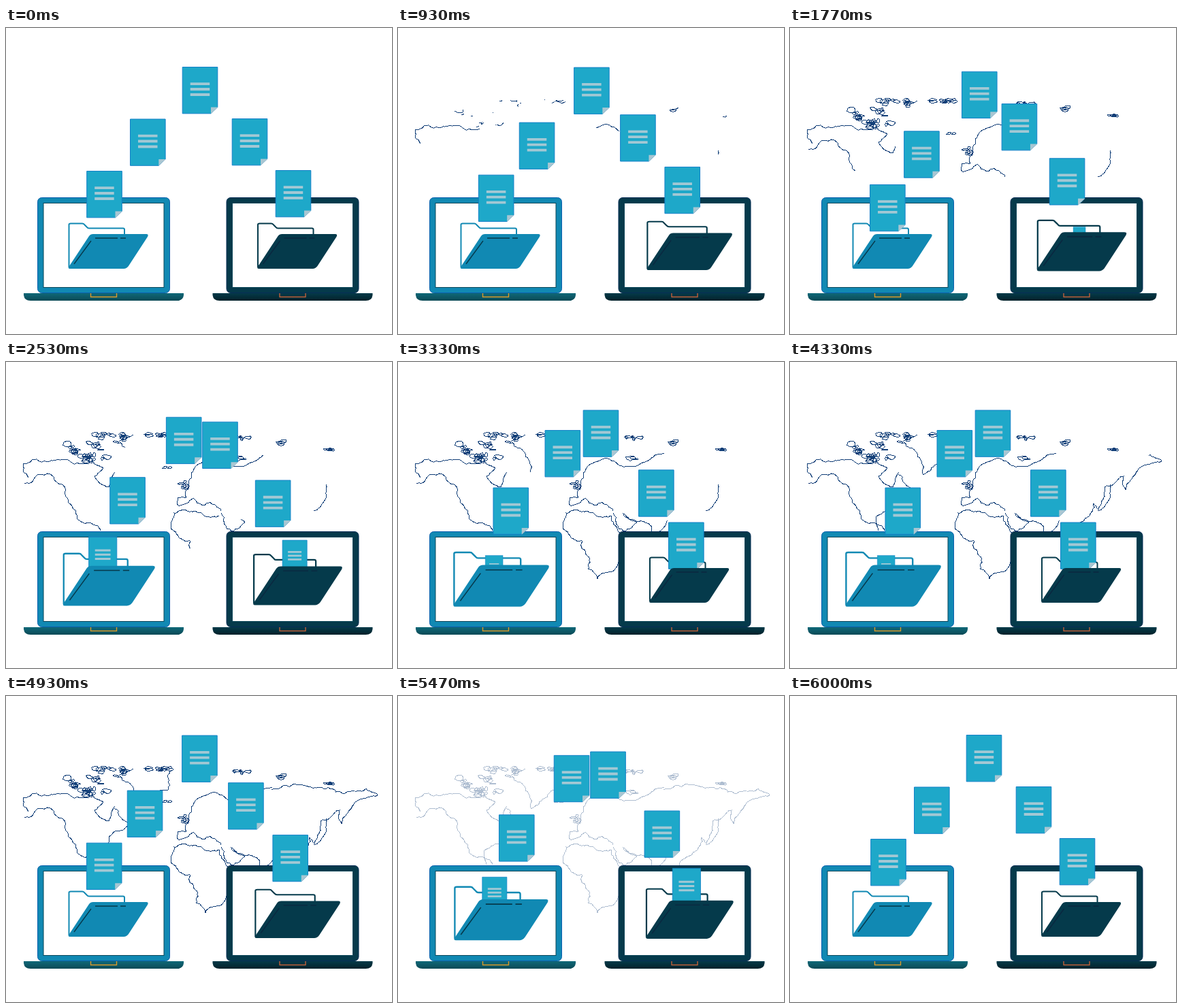
These frames come from a looping animation (567x450 px, 6030 ms). An HTML page:

```html
<!DOCTYPE html>
<html lang="en">
<head>
<meta charset="utf-8">
<title>File transfer</title>
<style>
  html, body { margin: 0; width: 100%; height: 100%; overflow: hidden; background: #fff; }
  svg { display: block; width: 567px; height: 450px; }
  #map path { fill: none; stroke: #123f78; stroke-width: 1; shape-rendering: crispEdges; }
  .left { --main: #1189b3; --edge: #0b5fae; --detail: #06384a; --notch: #d99a2b; }
  .right { --main: #053a4b; --edge: #062c55; --detail: #0b2740; --notch: #c0603a; }
  .lid { fill: var(--main); stroke: var(--edge); }
  .screen { fill: #fff; stroke: #0b4658; }
  .notch { fill: none; stroke: var(--notch); stroke-width: 1.4; }
  .back { fill: none; stroke: var(--main); stroke-width: 2; stroke-linejoin: round; }
  .front { fill: var(--main); }
  .detail { fill: none; stroke: var(--detail); stroke-width: 1.3; }
</style>
</head>
<body>
<svg viewBox="0 0 567 450">
  <defs>
    <linearGradient id="baseLeft" x2="0" y2="1">
      <stop stop-color="#0f6878"/><stop offset="1" stop-color="#0b4a56"/>
    </linearGradient>
    <linearGradient id="baseRight" x2="0" y2="1">
      <stop stop-color="#053a49"/><stop offset="1" stop-color="#03212a"/>
    </linearGradient>
    <g id="laptop">
      <rect class="lid" x="46.5" y="249.5" width="194" height="140" rx="6"/>
      <rect class="screen" x="55" y="257.5" width="177" height="124"/>
    </g>
    <path id="base" d="M26 390H261V393Q260 401 251 401H36Q27 401 26 393Z"/>
    <path id="notch" d="M124.500 390V395.500H162.500V390"/>
    <path id="back" d="M92.500 352V289Q92.500 287.500 95 287.500H112Q114 287.500 115 289L119 293Q120 294.500 122 294.500H172Q174 294.500 174 296.500V304"/>
    <g id="front">
      <path class="front" d="M128 303H206Q210 303 208 307L180 350Q177 354 173 354H94Q90 354 93 350L122 306Q124 303 128 303Z"/>
      <path class="detail" d="M100 347L125 313M131 309H164M168 309H176"/>
    </g>
    <g id="doc">
      <path d="M-25.800 -34H25.800V25L16 34.300H-25.800Z" fill="#1ea8c9" stroke="#1580c8"/>
      <path d="M16 34.800V25H26.300Z" fill="#a9c6d2"/>
      <path d="M-14.300 -9.300H14.200M-14.300 -1.500H14.200M-14.300 6.500H14.200" stroke="#a3c8d4" stroke-width="3.800"/>
    </g>
  </defs>

  <g id="map"></g>

  <g class="left">
    <use href="#laptop"/>
    <use href="#base" fill="url(#baseLeft)"/>
    <use href="#notch" class="notch"/>
    <use href="#back" class="back folder"/>
  </g>
  <g class="right" transform="translate(277.5)">
    <use href="#laptop"/>
    <use href="#base" fill="url(#baseRight)"/>
    <use href="#notch" class="notch"/>
    <use href="#back" class="back folder"/>
  </g>

  <g id="docs"></g>

  <g class="left"><use href="#front" class="folder"/></g>
  <g class="right" transform="translate(277.5)"><use href="#front" class="folder"/></g>
</svg>

<script>
const LOOP = 6030;
const SVG = 'http://www.w3.org/2000/svg';
const make = (tag, parent, attrs) => {
  const el = parent.appendChild(document.createElementNS(SVG, tag));
  for (const key in attrs) el.setAttribute(key, attrs[key]);
  return el;
};
const clamp = v => Math.min(1, Math.max(0, v));
const mix = (a, b, k) => a + (b - a) * k;

let seed = 7;
const random = () => (seed = seed * 16807 % 2147483647) / 2147483647;

// Bends a line sideways at its middle, again and again, into a coast.
function roughen([x0, y0], [x1, y1]) {
  const [dx, dy] = [x1 - x0, y1 - y0];
  if (Math.hypot(dx, dy) < 4) return [[x1, y1]];
  const bend = (random() - .5) * .36;
  const middle = [x0 + dx / 2 - dy * bend, y0 + dy / 2 + dx * bend];
  return [...roughen([x0, y0], middle), ...roughen(middle, [x1, y1])];
}

const map = document.getElementById('map');
const strokes = [];
function addStroke(from, to, corners) {
  const pts = corners.flatMap((p, i) => i ? roughen(corners[i - 1], p) : [p]);
  const el = make('path', map, { d: 'M' + pts.map(p => p.map(v => v.toFixed(1))).join('L') });
  const length = el.getTotalLength();
  el.style.strokeDasharray = `${length} ${length + 9}`;
  strokes.push({ el, from, to, length });
}
const addCoast = (from, to, text) =>
  addStroke(from, to, text.split(' ').map(p => p.split(',').map(Number)));

// Main capes and bays, drawn between two times in ms.
addCoast(690, 950, '33,170 25,150 40,143 110,150 128,147');                        // Alaska
addCoast(1000, 1900, '128,147 143,156 130,168 151,184 160,162');                   // Hudson Bay
addCoast(1000, 2250, '27,179 50,165 70,169 87,195 108,233 139,248');               // Pacific
addCoast(3350, 4300, '158,163 185,185 156,203 150,218 126,228 129,248');           // Atlantic
addCoast(1600, 4850, '187,107 157,117 176,127 196,166 212,152 238,138 241,109');   // Greenland
addCoast(750, 1760, '325,152 300,143 280,152 272,171 264,190 265,199 252,200 253,211 275,200 290,211 300,206 316,219');
addCoast(1950, 3250, '313,226 278,219 247,222 242,245 270,262 278,285 293,319 318,306 332,260 313,226');
addCoast(2100, 3250, '316,222 332,249 351,236 331,223 366,237 374,254 396,233');   // Arabia, India
addCoast(1000, 2900, '325,152 352,152 375,140 391,134');                           // White Sea
addCoast(800, 1750, '470,180 467,205 452,218');                                    // Japan
addCoast(3350, 4900, '413,249 437,228 446,208 453,217 462,184 490,168 493,188 503,170 546,146 510,139 460,135 426,130 390,137');

// Small islands, scattered over an oval patch.
function addIslands(count, x, y, rx, ry) {
  for (let n = 0; n < count; n++) {
    const cx = x + rx * (random() * 2 - 1);
    const cy = y + ry * (random() * 2 - 1);
    const w = 2 + random() * 5;
    const h = Math.min(ry, 1 + random() * 3);
    const ring = Array.from({ length: 8 }, (_, i) => {
      const a = i / 7 * Math.PI * 2;
      const r = i % 7 ? .6 + random() * .8 : 1;
      return [cx + w * r * Math.cos(a), cy + h * r * Math.sin(a)];
    });
    const from = 700 + random() * 700;
    addStroke(from, from + 400, ring);
  }
}
addIslands(26, 122, 133, 32, 14);
addIslands(12, 153, 109, 24, 4);
addIslands(8, 226, 107, 17, 2);
addIslands(6, 344, 112, 11, 2);
addIslands(3, 405, 117, 7, 3);
addIslands(3, 471, 130, 7, 2);
addIslands(5, 260, 182, 5, 6);
addIslands(2, 237, 156, 4, 2);
addIslands(3, 348, 138, 6, 8);

// A document passes one stop per second.
const stops = [[139.500, 330], [144.500, 244.500], [208.300, 168], [285, 91.500], [358, 167.500], [422, 243.500], [426, 323]];
const hermite = (k, v0, v1) =>
  v0 * (k ** 3 - 2 * k * k + k) + 3 * k * k - 2 * k ** 3 + v1 * (k ** 3 - k * k);
const eases = { 2: k => hermite(k, 1.2, 0), 3: k => hermite(k, 0, 1.1) };

const docLayer = document.getElementById('docs');
const docs = stops.slice(1).map(() => make('use', docLayer, { href: '#doc' }));

// A folder swells for two thirds of a second while a document is in it.
const swell = k => Math.sqrt(Math.sin(Math.PI * clamp(k * 1.5)));
const resize = (side, s) => document.querySelectorAll(`.${side} .folder`).forEach(el =>
  el.setAttribute('transform', `translate(143 325) scale(${s}) translate(-143 -325)`));

function draw(time) {
  // Thirty steps a second, on 0, 30 and 70 ms of each tenth.
  const rest = time % 100;
  const step = Math.floor(time / 100) * 3 + (rest >= 70 ? 2 : rest >= 30 ? 1 : 0);
  const t = step * 100 / 3;
  const phase = step % 30 / 30;

  docs.forEach((el, i) => {
    const k = eases[i] ? eases[i](phase) : phase;
    const x = mix(stops[i][0], stops[i + 1][0], k);
    const y = mix(stops[i][1], stops[i + 1][1], k);
    const u = i + phase;
    const s = clamp(Math.min(u, 6 - u) * 1.5);
    el.setAttribute('transform', `translate(${x.toFixed(2)} ${y.toFixed(2)}) scale(${s})`);
  });

  resize('left', 1 + .2 * swell(phase));
  resize('right', 1 + .13 * swell(phase - 1 / 3));

  for (const { el, from, to, length } of strokes) {
    const k = clamp((t - from) / (to - from));
    el.style.visibility = k > 0 ? 'visible' : 'hidden';
    el.style.strokeDashoffset = length * (1 - k);
  }
  map.style.opacity = 1 - clamp((t - 5200) / 400);
}

const start = performance.now();
function loop() {
  draw((performance.now() - start) % LOOP);
  requestAnimationFrame(loop);
}
loop();
</script>
</body>
</html>
```
